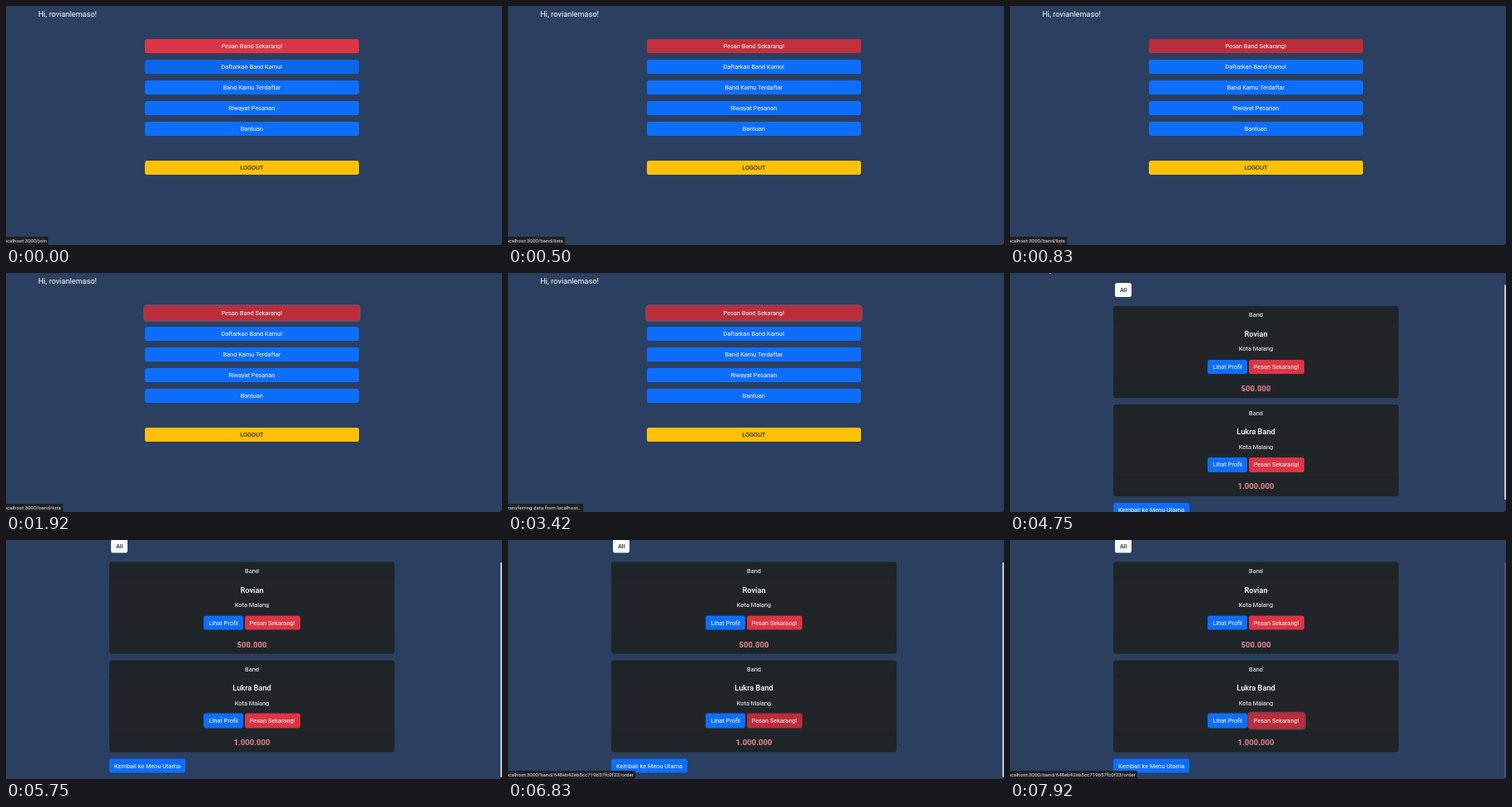
An HTML page that plays this animation: 600x289 px, repeating every 8000 ms.

```html
<!DOCTYPE html>
<html lang="id">
<head>
<meta charset="utf-8">
<title>Pesan Band</title>
<style>
  html, body { margin: 0; width: 100%; height: 100%; overflow: hidden; background: #2b3f60; }
  body { position: relative; font: 7.4px/17.6px Roboto, sans-serif; color: #fff; }
  div, span { position: absolute; box-sizing: border-box; white-space: nowrap; }
  .view { width: 600px; height: 289px; left: 0; top: 0; }
  .hi { left: 39px; top: 1.3px; font-size: 9.25px; }
  .btn { height: 17.6px; border-radius: 2.8px; text-align: center; background: #0d6efd; }
  .red { background: #dc3545; }
  .wide { left: 168px; width: 258.6px; }
  .card { left: 125px; width: 345px; height: 111px; border-radius: 2.8px; background: #212529;
          border: .5px solid #1d2227; overflow: hidden; }
  .card > div { left: 0; width: 100%; text-align: center; }
  .head { top: 0; height: 19px; line-height: 19px; background: #1f2428; border-bottom: .5px solid #1c2024; }
  .foot { bottom: 0; height: 22.7px; line-height: 22.7px; background: #1f2428; border-top: .5px solid #1c2024;
          font-size: 9.6px; font-weight: 700; color: #ea868f; }
  .name { top: 23.2px; font-size: 9.25px; font-weight: 500; }
  .city { top: 42px; }
  .row { top: 63.5px; display: flex; justify-content: center; gap: 1.85px; }
  .row .btn { position: static; padding: 0 6px; }
  #bar { left: 598px; top: 2px; width: 1.6px; height: 260px; border-radius: 1px; background: #c3cad5; }
  #status { left: 0; bottom: 0; height: 10px; line-height: 10px; padding-right: 2px; margin-left: -4px;
            font-size: 6.18px; color: #ececee; background: #1f2023; border-top-right-radius: 1px; }
  #corner { right: 0; bottom: 0; width: 3px; height: 3px;
            background: radial-gradient(circle at 0 0, transparent 2.6px, #10151f 3.2px); }
</style>
</head>
<body>
<div class="view" id="menu">
  <div class="hi">Hi, rovianlemaso!</div>
  <div class="btn red wide" id="order" style="top:39.5px">Pesan Band Sekarang!</div>
  <div class="btn wide" id="join" style="top:64.5px">Daftarkan Band Kamu!</div>
  <div class="btn wide" style="top:89.5px">Band Kamu Terdaftar</div>
  <div class="btn wide" style="top:114.5px">Riwayat Pesanan</div>
  <div class="btn wide" style="top:139.5px">Bantuan</div>
  <div class="btn wide" style="top:186.8px;background:#ffc107;color:#000">LOGOUT</div>
</div>
<div class="view" id="list">
  <div class="hi">Hi, rovianlemaso!</div>
  <div class="btn" style="left:127px;top:24.6px;width:20.3px;background:#f8f9fa;color:#000">All</div>
  <div class="btn" style="left:125px;top:290.6px;width:92px">Kembali ke Menu Utama</div>
</div>
<div id="bar"></div>
<div id="status"></div>
<div id="corner"></div>
<script>
const $ = id => document.getElementById(id);
const LOOP = 8000, STEP = 1000 / 12;
const RED = [220, 53, 69], RED_HOVER = [187, 45, 59];
const BLUE = [13, 110, 253], BLUE_HOVER = [11, 94, 215];

function addCard(top, name, price, id) {
  $('list').insertAdjacentHTML('beforeend', `<div class="card" style="top:${top}px">
    <div class="head">Band</div><div class="name">${name}</div><div class="city">Kota Malang</div>
    <div class="row"><div class="btn">Lihat Profil</div><div class="btn red" id="${id}">Pesan Sekarang!</div></div>
    <div class="foot">${price}</div></div>`);
}
addCard(53.4, 'Rovian', '500.000', 'pick1');
addCard(171.9, 'Lukra Band', '1.000.000', 'pick2');

const ramp = (t, a, b) => Math.min(1, Math.max(0, (t - a) / (b - a)));
const mix = (a, b, k) => `rgb(${a.map((v, i) => Math.round(v + (b[i] - v) * k))})`;

function paint(id, from, to, hover, focus = 0) {
  const s = $(id).style;
  s.background = mix(from, to, hover);
  s.boxShadow = focus ? `0 0 0 1.85px rgba(225,83,97,${focus * 0.5})` : 'none';
}

function statusText(t) {
  const host = 'localhost:3000/';
  if (t < 75) return host + 'join';
  if (t < 3410) return host + 'band/lists';
  if (t < 3575) return 'Transferring data from localhost…';
  return t < 6660 ? '' : host + 'band/648eb42eb5cc719b57fc0f23/order';
}

function draw(t) {
  const onList = t > 3575;
  $('menu').style.display = onList ? 'none' : '';
  $('list').style.display = $('bar').style.display = onList ? '' : 'none';

  paint('join', BLUE, BLUE_HOVER, 0.5 * (1 - ramp(t, 0, 170)));
  paint('order', RED, RED_HOVER, 0.75 * ramp(t, 0, 330) + 0.25 * ramp(t, 420, 830), ramp(t, 1580, 1910));
  paint('pick2', RED, RED_HOVER, ramp(t, 6330, 6500), ramp(t, 6830, 7160));

  const scroll = 1 - (1 - ramp(t, 4667, 5083)) ** 3;
  $('list').style.transform = `translateY(${-26.5 * scroll}px)`;
  $('bar').style.transform = `translateY(${25 * scroll}px)`;
  $('bar').style.opacity = 1 - 0.8 * ramp(t, 7583, 7917);

  const text = statusText(t);
  $('status').textContent = text;
  $('status').style.display = text ? '' : 'none';
}

function tick() {
  const t = performance.now() % LOOP;
  draw(Math.floor((t + 5) / STEP) * STEP % LOOP);
  requestAnimationFrame(tick);
}
tick();
</script>
</body>
</html>
```
